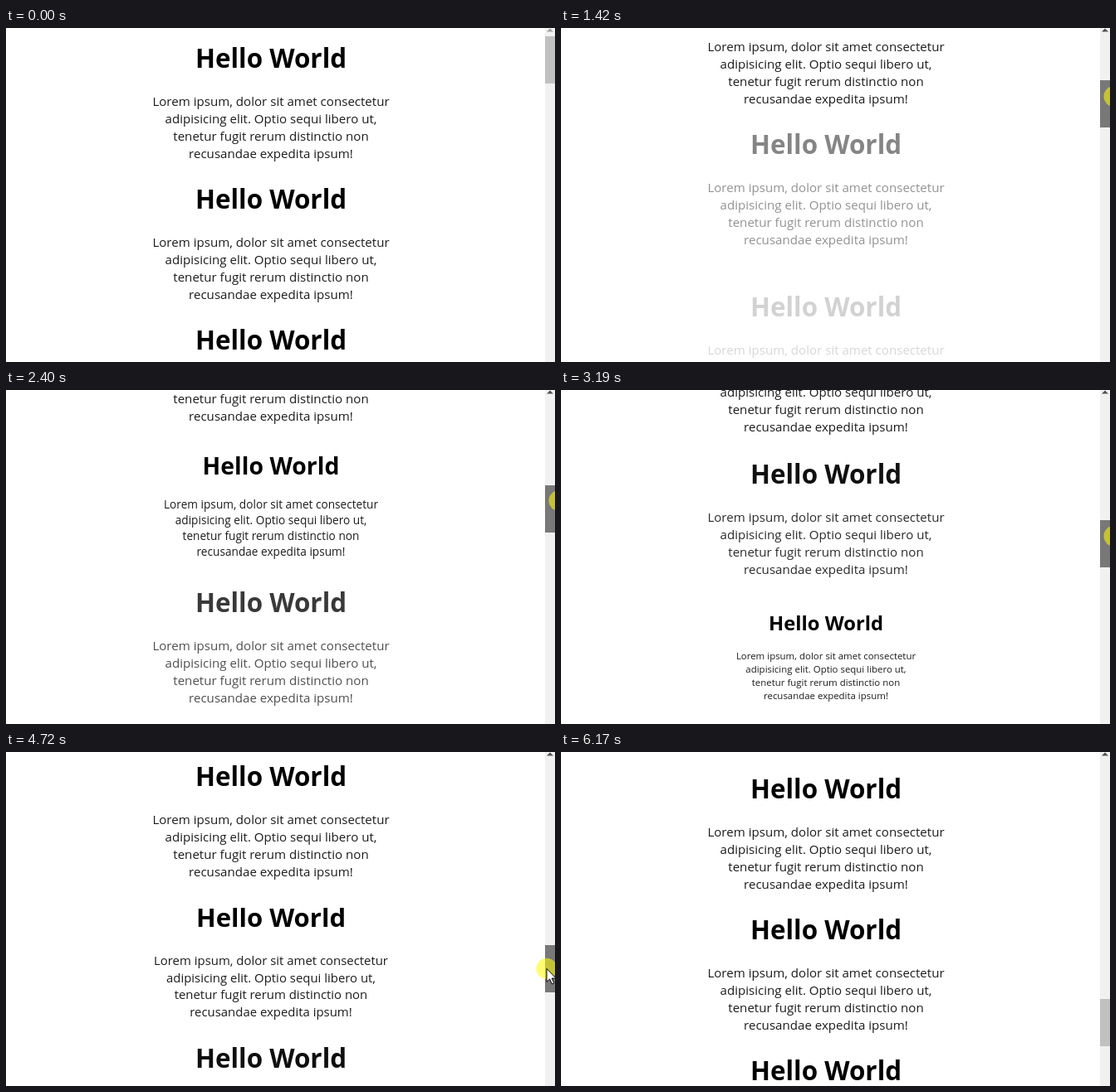
An HTML page for the animation above (6.71 s loop, 661 by 403 pixels).

```html
<!DOCTYPE html>
<html lang="en">
<head>
<meta charset="utf-8">
<title>Scroll reveal</title>
<style>
  html, body { margin: 0; width: 661px; height: 403px; overflow: hidden; background: #fff; }
  body { position: relative; color: #000; font-family: "Open Sans", sans-serif; text-align: center; }
  section { position: absolute; left: 169px; width: 300px; height: 148px; transform-origin: 50% 73px; }
  h1, p { position: absolute; margin: 0; width: 100%; white-space: nowrap; }
  h1 { top: .4px; font-size: 31.4px; line-height: 43px; font-weight: 700; }
  p { top: 63.5px; font-size: 15.1px; line-height: 21px; color: #1c1c1c; }
  svg { position: absolute; left: 0; top: 0; }
</style>
</head>
<body>
<svg width="661" height="403">
  <rect x="649" width="12" height="403" fill="#f1f1f1"/>
  <path id="arrow" d="M651 4.5 655 .5 659 4.5Z"/>
  <rect id="thumb" x="649" width="12" height="57"/>
  <g id="pointer">
    <circle r="12.5" fill="#fffa0a" fill-opacity=".57"/>
    <path d="M0 0V16L3.7 12.6 6.3 18.6 8.8 17.5 6.2 11.7H11.3Z" fill="#fff" stroke="#000"/>
  </g>
</svg>
<script>
const LOOP = 6710, REVEAL = 700, PITCH = 170, VIEW = 403, TOP = 14;
const PULL = 340, LAG = 130, RATIO = 7.65;
const $ = id => document.getElementById(id);

// Each pull on the scrollbar: start time and the offset it ends at
const pulls = [[1100, 410], [1880, 800], [2690, 1127], [3380, 1356],
  [3980, 1707], [4730, 1950], [5220, 2202]];

// Eased 0..1 ramp
function ramp(t, start, length) {
  const u = Math.min(1, Math.max(0, (t - start) / length));
  return u * u * (3 - 2 * u);
}

function scrollAt(t) {
  return pulls.reduce((s, [start, to]) => s + (to - s) * ramp(t, start, PULL), 0);
}

function timeOfScroll(offset) {
  let t = 0;
  while (t < LOOP && scrollAt(t) < offset) t += 5;
  return t;
}

// Same curve as the CSS keyword "ease"
function ease(x) {
  if (x <= 0) return 0;
  if (x >= 1) return 1;
  const bezier = (u, a, b) => 3 * u * (1 - u) * ((1 - u) * a + u * b) + u ** 3;
  let lo = 0, hi = 1;
  for (let n = 0; n < 20; n++) {
    const mid = (lo + hi) / 2;
    if (bezier(mid, .25, .25) < x) lo = mid; else hi = mid;
  }
  return bezier(lo, .1, 1);
}

// Fade, rise and zoom take turns; the first three are already revealed
const sections = Array.from({ length: 16 }, (_, i) => {
  const el = document.createElement("section");
  el.innerHTML = `<h1>Hello World</h1><p>Lorem ipsum, dolor sit amet consectetur<br>
    adipisicing elit. Optio sequi libero ut,<br>tenetur fugit rerum distinctio non<br>
    recusandae expedita ipsum!</p>`;
  document.body.insertBefore(el, document.querySelector("svg"));
  const y = TOP + PITCH * i;
  const start = i < 3 ? -REVEAL : timeOfScroll(y + 1 - VIEW);
  return { el, y, start, kind: ["fade", "rise", "zoom"][i % 3] };
});

function draw(t) {
  const scroll = Math.round(scrollAt(t));
  for (const { el, y, start, kind } of sections) {
    const p = ease((t - start) / REVEAL);
    el.style.top = y - scroll + "px";
    el.style.opacity = kind === "zoom" ? 1 : p;
    el.style.transform = p === 1 || kind === "fade" ? "none"
      : kind === "rise" ? `translateY(${32 * (1 - p)}px)` : `scale(${p})`;
  }
  $("thumb").setAttribute("y", Math.round(10 + scroll / RATIO));
  $("thumb").setAttribute("fill",
    t < 600 || t >= 6050 ? "#c1c1c1" : t < 1000 ? "#a8a8a8" : "#787878");
  $("arrow").setAttribute("fill", scroll ? "#505050" : "#a3a3a3");

  // The page trails slightly behind the pointer
  const x = 676 - 10 * ramp(t, 370, 500) - 15 * ramp(t, 3400, 1320) + 26 * ramp(t, 4900, 1100);
  $("pointer").setAttribute("transform", `translate(${x} ${29 + scrollAt(t + LAG) / RATIO})`);
}

const begin = performance.now();
function tick() {
  draw((performance.now() - begin) % LOOP);
  requestAnimationFrame(tick);
}
tick();
</script>
</body>
</html>
```
